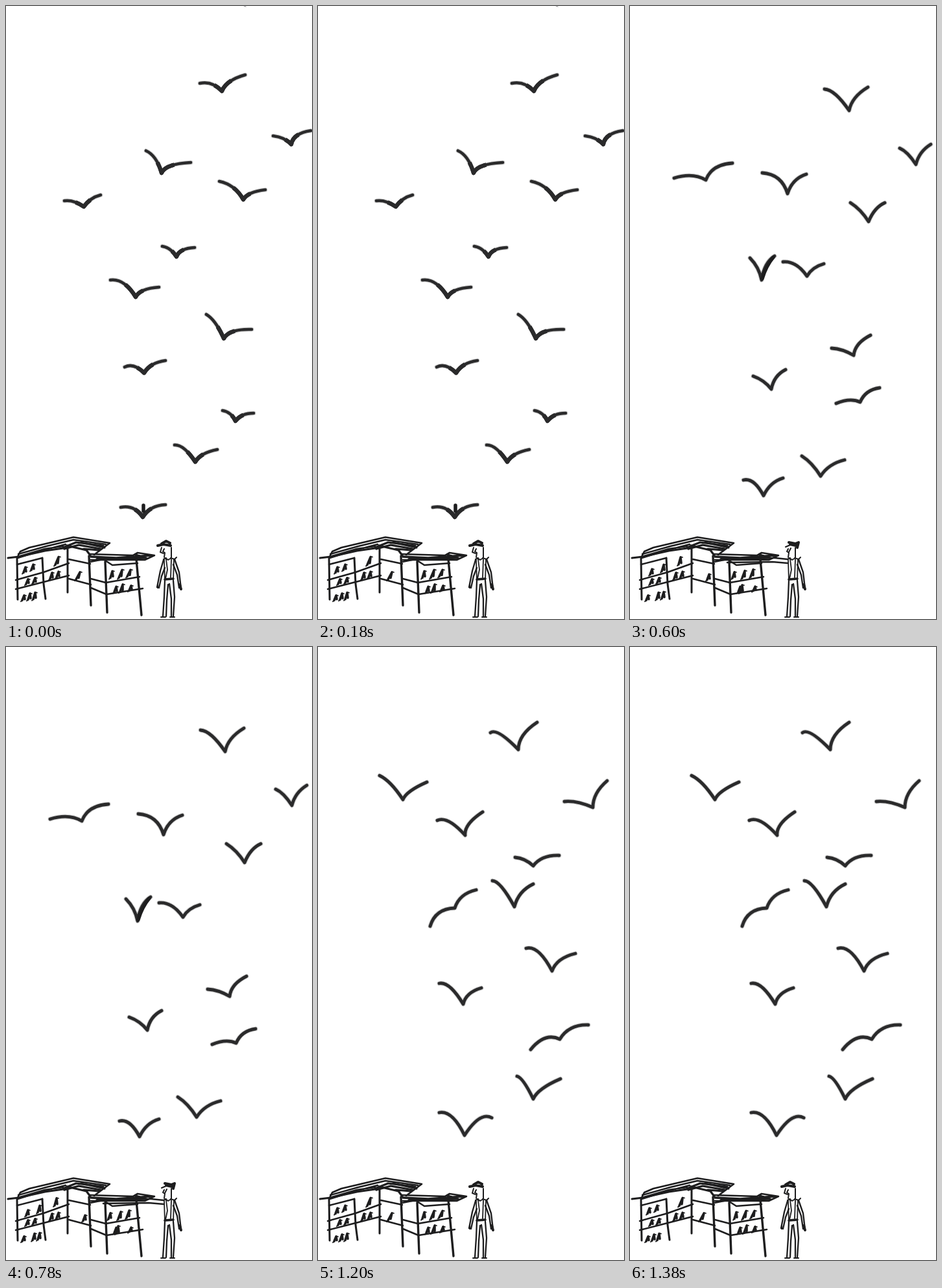
Write an HTML page that moves like this. It is 472 px wide and 944 px high and loops after 1.5 s.

```html
<!DOCTYPE html>
<html lang="en">
<head>
<meta charset="utf-8">
<title>Birds over the loft</title>
<style>
  html, body { margin: 0; width: 100%; height: 100%; overflow: hidden; background: #fff; }
  svg { display: block; width: 100%; height: 100%; }
  path { fill: none; stroke: #1d1d1e; stroke-linecap: round; stroke-linejoin: round; }
</style>
</head>
<body>
<svg id="stage" viewBox="0 0 472 944"></svg>
<script>
const HOLD = 300;
const stage = document.getElementById('stage');

function add(parent, tag, attrs = {}) {
  const node = document.createElementNS('http://www.w3.org/2000/svg', tag);
  for (const key in attrs) node.setAttribute(key, attrs[key]);
  return parent.appendChild(node);
}
const line = (parent, d, width = 2.5, more = {}) =>
  add(parent, 'path', { d, 'stroke-width': width, ...more });

// Soft brush stroke: dark core with a faint rim.
function brush(parent, d, width) {
  line(parent, d, width + 2, { opacity: .25 });
  line(parent, d, width, { style: 'stroke:#2a2a2b' });
}

// One bird per line: left tip, bend, body, bend, right tip.
function flock(width, text) {
  const group = add(stage, 'g');
  for (const row of text.trim().split('\n')) {
    const [tip, ...bends] = row.trim().split(' / ');
    brush(group, `M${tip}Q${bends.join(' ')}`, width);
  }
  return group;
}

function drawHouse() {
  const g = add(stage, 'g');
  // Left roof: loose strokes with paper showing between them
  line(g, 'M17 850 L22 840 L36 834 L104 818 L160 827 L136 845', 2.6);
  line(g, 'M3 850 L20 848 L60 839 L95 834', 3);
  line(g, 'M19 844 L62 832 L104 822 L154 829', 2.4);
  line(g, 'M18 850 L50 840 L92 829 M22 847 L60 836 L88 832', 2.6);
  line(g, 'M88 834 L108 826 L150 831 M90 836 L112 830 L146 836', 3.2);
  line(g, 'M94 831 L124 838 L130 846 M116 826 L152 834 M120 836 L143 838', 3.2);
  // Right roof
  line(g, 'M129 844 L196 846 L203 842 L229 846 L214 853 L131 853', 2.6);
  line(g, 'M131 848 L170 850 L224 846 M140 852 L216 850 L200 845', 3.4);
  // Posts
  line(g, 'M17 851 L18 914 M56 850 L58 890 L61 913 M95 836 L95 903', 3);
  line(g, 'M128 847 L131 923 M153 856 L156 934 M201 852 L209 938', 3.4);
  // Shelves
  line(g, 'M15 884 L58 872 L97 858 M15 898 L58 887 L97 877 M17 860 L56 850', 2.5);
  line(g, 'M97 852 L130 859 M97 882 L131 891 M131 882 L154 888 L206 879', 2.5);
  line(g, 'M131 896 L155 906 L211 897 M130 856 L150 852 L164 861 L203 858', 2.5);
}

// Small sitting bird; lean tips the body sideways.
function perch(parent, x, y, size = 1, lean = 3) {
  line(parent, `M${x - 2} ${y + 5 * size} L${x + lean - 2} ${y - 4 * size} L${x + 2} ${y + 3 * size}`, 3.6);
  line(parent, `M${x + lean - 2} ${y - 5 * size} l3 1 M${x - 2} ${y + 5 * size} l-2 2`, 1.8);
}

function drawPerched(parent, spots) {
  for (const [x, y, size, lean] of spots) perch(parent, x, y, size, lean);
}

function drawBody() {
  const g = add(stage, 'g');
  line(g, 'M243 852 L247 850 M254 850 L260 852 L263 849 M255 834 L255 849', 2);
  line(g, 'M244 836 L242 840 L245 842 L244 849 M246 850 L250 853 L255 850', 2);
  line(g, 'M244 853 L245 885 M247 852 L249 868 L246 882 M259 852 L258 885 M255 852 L254 880', 1.8);
  line(g, 'M245 883 L258 882', 3.6);
  line(g, 'M245 885 L244 910 L242 940 M250 891 L248 915 L247 940', 2.3);
  line(g, 'M258 885 L260 910 L258 940 M252 890 L255 913 L255 940', 2.3);
  line(g, 'M239 941 L246 941 M253 941 L260 941', 2);
  line(g, 'M260 852 L267 872 L270 897 M258 860 L264 876 L267 896', 2.3);
  line(g, 'M268 891 L270 898', 4);
}

function drawRest() {
  const g = add(stage, 'g');
  drawPerched(g, [[29, 868, .9], [41, 864, .9], [27, 911, .8], [36, 909], [44, 908, 1.1], [78, 854, 1.3, 5],
    [110, 877, 1.2, 6], [163, 875, 1.1], [176, 874, 1.3, 5], [189, 873, 1.1, 5], [178, 896, 1.2, 4], [192, 896, .8]]);
  line(g, 'M234 831 L243 829 L254 831 M240 828 L247 824 L253 827', 4);
  line(g, 'M240 834 L238 841 L243 843', 2);
  line(g, 'M243 853 L238 870 L233 895 M245 865 L240 878 L236 896 M234 890 L234 896', 2.3);
  return g;
}

function drawReach(arm, spots) {
  const g = add(stage, 'g');
  drawPerched(g, [[27, 911, .8], [43, 908, 1.1], [51, 907, 1.1], [77, 854, 1.2], ...spots]);
  line(g, 'M245 826 L255 828 L260 826 L258 834 M247 829 L256 831', 4);
  line(g, 'M240 833 L247 830 M248 835 L245 841', 2);
  line(g, arm, 2.5);
  return g;
}

drawHouse();
const always = add(stage, 'g');
drawPerched(always, [[33, 886, .8], [44, 884, .8], [70, 877, 1], [80, 875, .9], [169, 898, .9]]);
drawBody();

const rest = drawRest();
const point = drawReach('M243 851 L224 866 L209 883 L212 885 L229 872 L243 862',
  [[41, 867, .9], [51, 864, 1.1], [110, 877, .9], [163, 876], [175, 875, 1.2, 4], [188, 873, 1.2, 4], [172, 897, 1.2], [190, 897, .7]]);
const raise = drawReach('M243 852 L224 850 L203 850 M243 858 L220 856 L150 857',
  [[33, 871, .9], [51, 865, 1.1], [121, 879, .9], [160, 876], [175, 875, 1.2, 4], [188, 873, 1.2, 4], [172, 897, 1.2], [192, 897, .7]]);
const men = [rest, point, raise, rest, rest];

const swoop = flock(4.6, `
  299 119 / 318 115 / 333 131 / 340 114 / 369 106
  412 200 / 430 202 / 440 213 / 443 196 / 470 192
  216 223 / 232 230 / 240 257 / 246 243 / 285 241
  329 270 / 353 275 / 366 298 / 373 286 / 400 283
  90 300 / 104 298 / 120 309 / 130 295 / 146 291
  241 370 / 254 372 / 263 386 / 268 373 / 291 372
  161 422 / 182 419 / 200 448 / 207 435 / 236 433
  309 475 / 323 483 / 336 512 / 344 497 / 379 498
  183 556 / 197 549 / 213 565 / 223 549 / 246 546
  334 623 / 347 625 / 354 639 / 363 627 / 382 627
  260 676 / 274 675 / 292 702 / 300 688 / 326 683
  177 772 / 198 768 / 211 787 / 222 769 / 246 768`);
// Heavier ink around each body, and the head of the lowest bird.
for (const wing of [...swoop.children]) {
  line(swoop, wing.getAttribute('d'), 6.2, { pathLength: 100, 'stroke-dasharray': '44 100', 'stroke-dashoffset': -28, style: 'stroke:#2a2a2b;stroke-linecap:butt' });
}
line(swoop, 'M212 769 L212 778', 5.5);
line(swoop, 'M367 0 L370 1', 1, { opacity: .5 });

const glide = flock(4.8, `
  292 151 / 299 132 / 333 133 / 356 114 / 378 133
  405 225 / 415 207 / 443 217 / 454 206 / 474 209
  194 254 / 213 246 / 243 260 / 255 250 / 285 262
  326 302 / 343 289 / 365 301 / 387 287 / 402 305
  93 273 / 104 277 / 119 299 / 125 270 / 148 263
  229 401 / 247 384 / 264 391 / 287 374 / 302 392
  178 408 / 191 418 / 199 436 / 206 421 / 240 421
  299 517 / 319 502 / 340 516 / 360 504 / 382 517
  184 584 / 194 567 / 216 567 / 232 554 / 250 571
  336 597 / 348 611 / 354 627 / 364 615 / 386 610
  259 706 / 273 691 / 295 706 / 315 698 / 328 715
  181 752 / 197 758 / 208 771 / 219 751 / 238 749`);
line(glide, 'M340 514 Q360 508 381 516', 5.4);
line(glide, 'M367 2 L371 3', 1, { opacity: .5 });

const lift = flock(4.8, `
  300 128 / 316 129 / 338 161 / 342 140 / 367 125
  416 219 / 428 224 / 441 244 / 446 224 / 464 213
  204 257 / 234 259 / 243 289 / 250 266 / 272 259
  340 303 / 356 313 / 368 332 / 377 310 / 393 303
  68 265 / 97 256 / 117 268 / 126 244 / 158 242
  236 394 / 256 392 / 273 416 / 281 402 / 299 397
  185 388 / 199 402 / 203 422 / 207 395 / 223 385
  311 527 / 328 528 / 345 538 / 347 519 / 371 507
  190 570 / 207 576 / 218 590 / 222 569 / 240 560
  318 612 / 340 603 / 355 610 / 363 591 / 385 588
  265 693 / 281 703 / 294 724 / 306 705 / 331 699
  175 730 / 191 726 / 206 754 / 216 733 / 236 727`);
line(lift, 'M204 420 Q210 400 221 387', 5.4);

const sweep = flock(4.8, `
  307 187 / 320 169 / 348 175 / 364 153 / 387 162
  414 267 / 429 250 / 448 261 / 453 241 / 467 240
  222 313 / 231 301 / 258 300 / 267 284 / 291 276
  336 358 / 341 342 / 375 348 / 382 332 / 407 330
  43 225 / 59 212 / 95 242 / 88 222 / 119 202
  261 361 / 269 363 / 280 386 / 287 375 / 314 371
  166 403 / 176 377 / 207 382 / 212 362 / 245 364
  294 520 / 303 486 / 332 498 / 368 473 / 384 487
  164 543 / 177 544 / 191 554 / 192 536 / 212 526
  326 567 / 345 566 / 360 589 / 368 570 / 388 564
  277 684 / 298 683 / 310 695 / 327 680 / 357 687
  160 745 / 178 721 / 203 729 / 232 711 / 252 738`);

const climb = flock(4.8, `
  266 132 / 276 124 / 309 158 / 309 135 / 338 116
  380 238 / 398 236 / 424 247 / 424 225 / 446 206
  184 267 / 200 260 / 227 290 / 225 273 / 254 254
  304 324 / 319 325 / 332 337 / 345 320 / 372 321
  95 198 / 112 206 / 131 235 / 136 222 / 168 208
  269 360 / 281 360 / 303 400 / 309 376 / 332 365
  173 430 / 181 403 / 211 402 / 218 380 / 244 374
  321 464 / 340 459 / 361 499 / 368 479 / 397 472
  187 518 / 203 515 / 224 550 / 228 532 / 252 525
  328 620 / 350 593 / 373 604 / 387 581 / 417 582
  307 661 / 316 663 / 332 696 / 339 680 / 374 665
  187 717 / 207 713 / 226 752 / 250 715 / 268 725`);
const flocks = [swoop, glide, lift, sweep, climb];

function show(time) {
  const step = Math.floor(time / HOLD) % flocks.length;
  for (const group of [...flocks, ...men]) group.style.display = 'none';
  flocks[step].style.display = men[step].style.display = '';
}

function tick() {
  show(performance.now() - start);
  requestAnimationFrame(tick);
}
const start = performance.now();
show(0);
requestAnimationFrame(tick);
</script>
</body>
</html>
```
